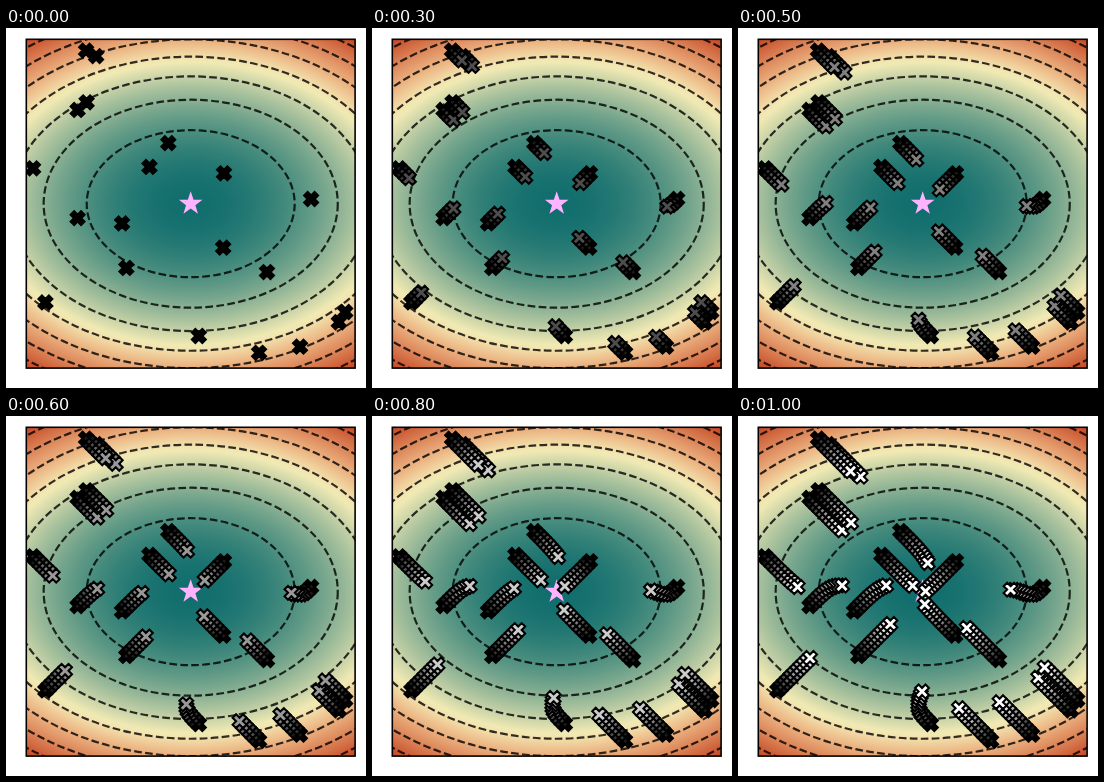
Animation, 360 px wide and 360 px high, one loop 1.1 s. Source, as an HTML page with a canvas:

```html
<!DOCTYPE html>
<html lang="en">
<head>
<meta charset="utf-8">
<title>Adam on a quadratic bowl</title>
<style>
  html, body { margin: 0; width: 100%; height: 100%; overflow: hidden; background: #fff; }
  canvas { display: block; width: 360px; height: 360px; }
</style>
</head>
<body>
<canvas id="stage" width="360" height="360"></canvas>
<script>
const SIZE = 360, STEPS = 10, STEP_MS = 100, COUNT = 20, SEED = 42;
const CX = 184.7, CY = 175.7, HALF = 164.4;
const LEFT = CX - HALF, TOP = CY - HALF;
const MAX_LOSS = 1.5, LEVEL = 0.2;

// Mersenne Twister, read as 53-bit numbers in [0, 1).
function twister(seed) {
  const N = 624, mt = new Uint32Array(N);
  mt[0] = seed;
  for (let i = 1; i < N; i++) {
    mt[i] = Math.imul(1812433253, mt[i - 1] ^ (mt[i - 1] >>> 30)) + i;
  }
  let i = 0;
  function word() {
    let y = (mt[i] & 0x80000000) | (mt[(i + 1) % N] & 0x7fffffff);
    mt[i] = mt[(i + 397) % N] ^ (y >>> 1) ^ (y & 1 ? 0x9908b0df : 0);
    y = mt[i];
    i = (i + 1) % N;
    y ^= y >>> 11;
    y ^= (y << 7) & 0x9d2c5680;
    y ^= (y << 15) & 0xefc60000;
    y ^= y >>> 18;
    return y >>> 0;
  }
  return () => {
    const high = word() >>> 5, low = word() >>> 6;
    return (high * 2 ** 26 + low) / 2 ** 53;
  };
}

// Adam on loss = x²/2 + y²; each coordinate evolves independently.
function adam(p, curvature) {
  const rate = 0.02, b1 = 0.9, b2 = 0.999;
  const path = [p];
  let m = 0, v = 0;
  for (let n = 1; n <= STEPS; n++) {
    const g = curvature * p;
    m = b1 * m + (1 - b1) * g;
    v = b2 * v + (1 - b2) * g * g;
    p -= rate * (m / (1 - b1 ** n)) / (Math.sqrt(v / (1 - b2 ** n)) + 1e-8);
    path.push(p);
  }
  return path;
}

const random = twister(SEED);
const paths = curvature =>
  Array.from({ length: COUNT }, () => adam(2 * random() - 1, curvature));
const xs = paths(1), ys = paths(2);

const ramp = [
  [0, [17, 110, 109]],
  [0.5, [244, 235, 181]],
  [0.667, [234, 173, 124]],
  [1, [197, 70, 34]]
];

function rampColor(t) {
  const i = Math.max(1, ramp.findIndex(([stop]) => t <= stop));
  const [t0, a] = ramp[i - 1], [t1, b] = ramp[i];
  const k = (t - t0) / (t1 - t0);
  return `rgb(${a.map((v, j) => Math.round(v + (b[j] - v) * k))})`;
}

function polygon(points) {
  const path = new Path2D();
  points.forEach(([x, y]) => path.lineTo(x, y));
  path.closePath();
  return path;
}

function crossPoints(unit) {
  const points = [];
  let arm = [[0, -1], [1, -2], [2, -1]];
  for (let turn = 0; turn < 4; turn++) {
    points.push(...arm.map(([x, y]) => [x * unit, y * unit]));
    arm = arm.map(([x, y]) => [-y, x]);
  }
  return points;
}

function starPoints(outer, inner) {
  return Array.from({ length: 10 }, (_, i) => {
    const r = i % 2 ? inner : outer, a = i * Math.PI / 5;
    return [r * Math.sin(a), -r * Math.cos(a)];
  });
}

const cross = polygon(crossPoints(3.47));
const star = polygon(starPoints(12.4, 4.9));

function clipToPlot(c) {
  c.beginPath();
  c.rect(LEFT, TOP, 2 * HALF, 2 * HALF);
  c.clip();
}

function makeBackground() {
  const layer = document.createElement("canvas");
  layer.width = layer.height = SIZE;
  const c = layer.getContext("2d");
  c.fillStyle = "#fff";
  c.fillRect(0, 0, SIZE, SIZE);
  clipToPlot(c);
  c.translate(CX, CY);

  // Radius is the square root of the loss, so the ramp is sampled at r².
  const gradient = c.createRadialGradient(0, 0, 0, 0, 0, 1);
  for (let r = 0; r <= 60; r++) gradient.addColorStop(r / 60, rampColor((r / 60) ** 2));
  c.save();
  c.scale(HALF * Math.sqrt(2 * MAX_LOSS), HALF * Math.sqrt(MAX_LOSS));
  c.fillStyle = gradient;
  c.fillRect(-1, -1, 2, 2);
  c.restore();

  c.strokeStyle = "rgba(0, 0, 0, 0.8)";
  c.lineWidth = 2.2;
  c.setLineDash([7.7, 3.3]);
  for (let loss = LEVEL; loss < MAX_LOSS; loss += LEVEL) {
    c.beginPath();
    c.ellipse(0, 0, HALF * Math.sqrt(2 * loss), HALF * Math.sqrt(loss), 0, 0, 2 * Math.PI);
    c.stroke();
  }

  c.fillStyle = "#ffb3ff";
  c.fill(star);
  return layer;
}

const ctx = document.getElementById("stage").getContext("2d");
const background = makeBackground();

function drawCross(x, y) {
  ctx.save();
  ctx.translate(CX + x * HALF, CY - y * HALF);
  ctx.fill(cross);
  ctx.stroke(cross);
  ctx.restore();
}

function draw(step) {
  ctx.drawImage(background, 0, 0);
  ctx.strokeStyle = "#000";
  ctx.save();
  clipToPlot(ctx);
  ctx.lineWidth = 2.08;
  for (let n = 0; n <= step; n++) {
    const gray = Math.round(255 * n / STEPS);
    ctx.fillStyle = `rgb(${gray}, ${gray}, ${gray})`;
    for (let i = 0; i < COUNT; i++) drawCross(xs[i][n], ys[i][n]);
  }
  ctx.restore();
  ctx.lineWidth = 1.6;
  ctx.strokeRect(LEFT, TOP, 2 * HALF, 2 * HALF);
}

const began = performance.now();
let shown = -1;

function tick() {
  const step = Math.floor((performance.now() - began) / STEP_MS) % (STEPS + 1);
  if (step !== shown) draw(shown = step);
  requestAnimationFrame(tick);
}
tick();
</script>
</body>
</html>
```
